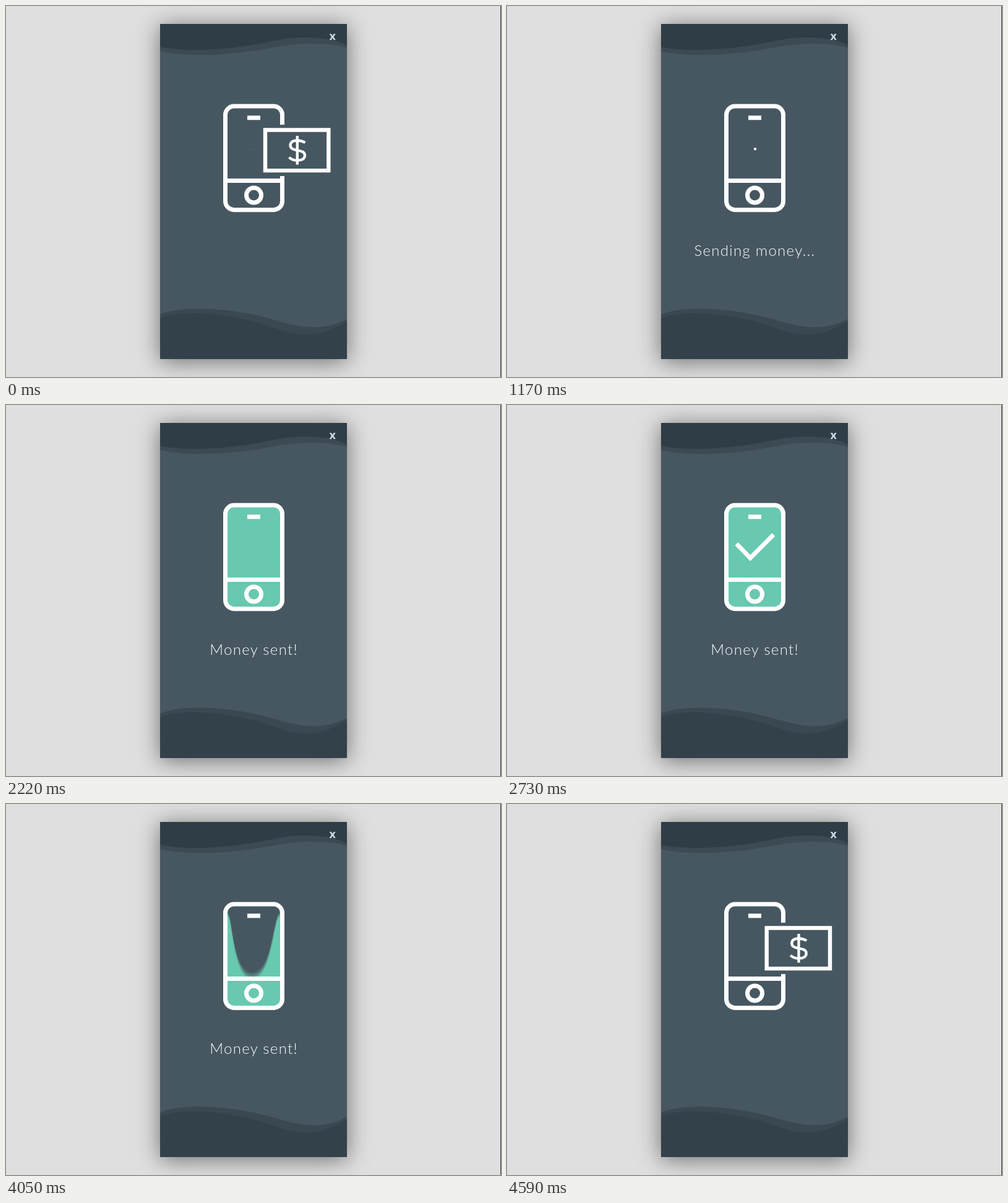
An HTML page with a canvas for the animation above (4.62 s loop, 800 by 600 pixels).

```html
<!DOCTYPE html>
<html lang="en">
<head>
<meta charset="utf-8">
<title>Sending money</title>
<style>
  html, body { margin: 0; width: 100%; height: 100%; overflow: hidden; background: #dfdfdf; }
  canvas, svg { position: absolute; left: 0; top: 0; width: 800px; height: 600px; }
  .label { font: 300 24px Lato, sans-serif; letter-spacing: 1.3px; fill: #fff; text-anchor: middle; }
  .close { font: 700 18px "Open Sans", "Noto Sans", sans-serif; fill: #cfdbe4; text-anchor: middle; }
</style>
</head>
<body>
<canvas id="stage" width="800" height="600"></canvas>
<svg viewBox="0 0 800 600">
  <text class="close" x="527.6" y="55">x</text>
  <text class="label" id="sending" x="400.4" y="403.5">Sending money...</text>
  <text class="label" id="sent" x="400.6" y="403.5">Money sent!</text>
</svg>
<script>
const LOOP = 4620, STEP = 30, SHUTTER = 16, SAMPLES = 8;
const WHITE = '#fff', GREEN = '#66c4ab';
const TOP = 165, LEFT = 358, RIGHT = 443;

const layer = () => Object.assign(document.createElement('canvas'), { width: 800, height: 600 });
const stage = document.getElementById('stage').getContext('2d');
const backdrop = layer(), scratch = layer(), blend = layer();
const art = scratch.getContext('2d'), mix = blend.getContext('2d');
const sending = document.getElementById('sending');
const sent = document.getElementById('sent');

const clamp = v => Math.min(1, Math.max(0, v));
const linear = (t, a, b) => clamp((t - a) / (b - a));
const ease = (t, a, b) => {
  const p = linear(t, a, b);
  return p * p * (3 - 2 * p);
};

function paintBackdrop(c) {
  const fill = (color, d) => {
    c.fillStyle = color;
    c.fill(new Path2D(d));
  };
  c.fillStyle = '#dfdfdf';
  c.fillRect(0, 0, 800, 600);
  c.fillStyle = '#333';
  c.fillRect(799, 0, 1, 600);

  c.save();
  c.shadowColor = 'rgba(0,0,0,.5)';
  c.shadowBlur = 34;
  c.shadowOffsetY = 4;
  c.fillStyle = '#465761';
  c.fillRect(249, 29, 302, 542);
  c.restore();

  fill('#3c4a54', 'M249 29V73C300 85 380 77.5 430 67.5S530 60 551 68V29Z');
  fill('#2f3d46', 'M249 29V66C300 77 380 68 430 57S530 51 551 64V29Z');
  fill('#3a4852', 'M249 571V499C290 481 380 491 435 508S520 522 551 506V571Z');
  fill('#33414a', 'M249 571V505C290 488 380 500 435 521S520 528 551 510V571Z');
}

const dollar = new Path2D('M470.8 210V256.5M483.5 221C479 218.4 475 217.5 470.5 217.5' +
  'C463 217.5 459.5 221 459.5 225.3C459.5 237 483 230 483 241.5' +
  'C483 247 478 249.7 471 249.7C465 249.7 461 248 457.5 244.7');
const check = new Path2D('M371 224.5L393.2 247.5L430.8 209.8');

function stroke(path, width) {
  art.lineWidth = width;
  art.stroke(path);
}

function roundRect(x, y, w, h, r) {
  const p = new Path2D();
  p.roundRect(x, y, w, h, r);
  return p;
}
const frame = roundRect(354.5, 162, 92, 167.7, 14);
const screen = roundRect(355.5, 163, 90, 165.7, 13);

// Area above the liquid's edge; side and tip are its heights at the walls and centre.
function above(side, tip, knee) {
  const y = f => side + (tip - side) * f;
  const p = new Path2D();
  p.moveTo(LEFT - 4, TOP - 4);
  p.lineTo(LEFT - 4, side);
  p.lineTo(LEFT, side);
  if (knee) {
    p.bezierCurveTo(362, y(.2), 364, y(.38), 372, y(.47));
    p.bezierCurveTo(384, y(.6), 387, tip, 396, tip);
    p.bezierCurveTo(405, tip, 416, y(.56), 425, y(.47));
    p.bezierCurveTo(434, y(.4), 438, y(.14), RIGHT, side);
  } else {
    p.bezierCurveTo(366, side, 366, tip, 398, tip);
    p.bezierCurveTo(431, tip, 432, side, RIGHT, side);
  }
  p.lineTo(RIGHT + 4, side);
  p.lineTo(RIGHT + 4, TOP - 4);
  p.closePath();
  return p;
}

function paintLiquid(t) {
  if (t < 1730 || t > 4310) return;
  art.save();
  art.clip(screen);
  art.fillStyle = GREEN;
  if (t < 3000) {
    art.fill(above(TOP + 170 * ease(t, 1830, 2160), TOP + 190 * ease(t, 1740, 2040), true));
  } else {
    art.fillRect(350, 160, 100, 175);
    art.globalCompositeOperation = 'destination-out';
    art.fill(above(TOP + 170 * ease(t, 4000, 4290), TOP + 185 * ease(t, 3860, 4190), false));
  }
  art.restore();
}

function paintPhone() {
  stroke(frame, 7);
  stroke(new Path2D('M355 282.4H446'), 7);
  stroke(new Path2D('M390 180.8H411'), 7);
  const button = new Path2D();
  button.arc(400.5, 306, 12, 0, 2 * Math.PI);
  stroke(button, 7);
}

function billShift(t) {
  if (t < 2000) return -121 * ease(t, 90, 670);
  return -121 + 122.6 * ease(t, 4285, 4530) - 1.6 * ease(t, 4530, 4640);
}

function paintBill(t) {
  const dx = billShift(t);
  if (dx < -120.9) return;
  art.save();
  art.beginPath();
  art.rect(405, 150, 200, 160);
  art.clip();
  art.translate(dx, 0);
  art.clearRect(410, 191.7, 120, 83.3);
  const note = new Path2D();
  note.rect(419, 200.5, 102.3, 65.6);
  stroke(note, 6.4);
  stroke(dollar, 4.3);
  art.restore();
}

function paintSlot(t) {
  const h = 84.4 * ease(t, 0, 150) * (1 - ease(t, 600, 810));
  art.fillStyle = WHITE;
  if (t < 810) art.fillRect(399.2, 231.3 - h / 2, 3.6, h);
  if (t > 990 && t < 1830) {
    const s = 3.8 * ease(t, 990, 1170);
    art.fillRect(401 - s / 2, 231.2 - s / 2, s, s);
  }
}

function paintCheck(t) {
  const s = (1.1 * ease(t, 2400, 2550) - .1 * ease(t, 2550, 2730)) * (1 - ease(t, 3750, 3960));
  if (s < .01) return;
  art.save();
  art.translate(401, 230);
  art.scale(s, s);
  art.translate(-401, -230);
  stroke(check, 7);
  art.restore();
}

function paintArt(t) {
  art.clearRect(0, 0, 800, 600);
  art.strokeStyle = WHITE;
  paintSlot(t);
  paintLiquid(t);
  paintPhone();
  paintBill(t);
  paintCheck(t);
}

// Averages a few moments around t to give motion blur.
function paintBlurred(t) {
  mix.globalCompositeOperation = 'source-over';
  mix.clearRect(0, 0, 800, 600);
  mix.globalCompositeOperation = 'lighter';
  mix.globalAlpha = 1 / SAMPLES;
  for (let i = 0; i < SAMPLES; i++) {
    const offset = ((i + .5) / SAMPLES - .5) * SHUTTER;
    paintArt(Math.min(LOOP, Math.max(0, t + offset)));
    mix.drawImage(scratch, 0, 0);
  }
}

function render(t) {
  paintBlurred(t);
  stage.drawImage(backdrop, 0, 0);
  stage.drawImage(blend, 0, 0);
  sending.style.opacity = linear(t, 0, 270) * (1 - linear(t, 1500, 1800));
  sent.style.opacity = linear(t, 1860, 2190) * (1 - linear(t, 4260, 4560));
}

const start = performance.now();
let last = -1;
function tick() {
  const now = Math.max(0, performance.now() - start) % LOOP;
  const t = Math.floor(now / STEP) * STEP;
  if (t !== last) render(last = t);
  requestAnimationFrame(tick);
}

paintBackdrop(backdrop.getContext('2d'));
render(0);
requestAnimationFrame(tick);
</script>
</body>
</html>
```
